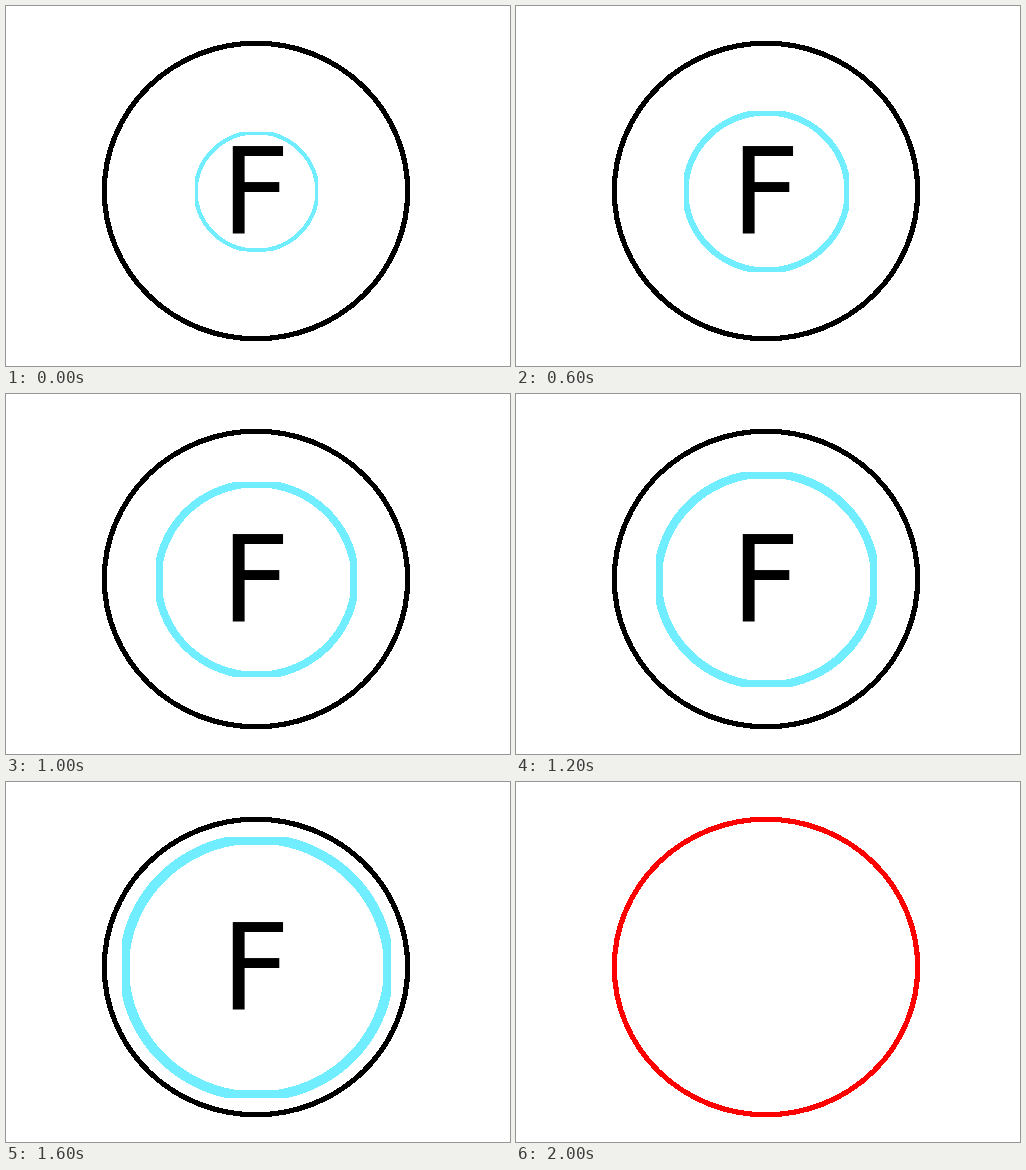
Recreate the animation shown at these times as an HTML page. Size 504 by 360 pixels, loop 2.5 s.

```html
<!DOCTYPE html>
<html lang="en">
<head>
<meta charset="utf-8">
<style>
  html, body { margin: 0; width: 100%; height: 100%; overflow: hidden; background: #fff; }
  svg { display: block; width: 504px; height: 360px; }
  text { font: 120px "DejaVu Sans", sans-serif; }
</style>
</head>
<body>
<svg viewBox="0 0 504 360" fill="none" shape-rendering="crispEdges">
  <clipPath id="inside"><ellipse cx="250" cy="185" rx="152" ry="148"/></clipPath>
  <g clip-path="url(#inside)"><path id="wave" fill="#70eeff" fill-rule="evenodd"/></g>
  <ellipse id="rim" cx="250" cy="185" rx="151.7" ry="147.8" stroke-width="5.2"/>
  <text id="key" x="214.9" y="228" fill="#000">F</text>
</svg>
<script>
const LOOP = 2500, STEP = 100, LAST = 20;
const CX = 250.5, CY = 185.5;
const [wave, rim, key] = ["wave", "rim", "key"].map(id => document.getElementById(id));

const clampUnit = v => Math.max(-1, Math.min(1, v));

// Ellipse enlarged by `bulge`, then cut flat at rx and ry.
function flattened(rx, ry, bulge) {
  const points = [];
  for (let degrees = 0; degrees < 360; degrees += 3) {
    const a = degrees * Math.PI / 180;
    points.push((CX + rx * clampUnit(bulge * Math.cos(a))).toFixed(2) + "," +
                (CY + ry * clampUnit(bulge * Math.sin(a))).toFixed(2));
  }
  return "M" + points.join("L") + "Z";
}

function draw(ms) {
  const step = Math.min(LAST, Math.floor((ms % LOOP) / STEP));
  const done = step === LAST;
  rim.setAttribute("stroke", done ? "#f00" : "#000");
  key.style.display = wave.style.display = done ? "none" : "";
  if (done) return;

  const scale = 1.05 ** step;
  const width = 3.4 + 0.3 * step;
  const rx = 61.6 * scale, ry = 60 * scale;
  wave.setAttribute("d", flattened(rx, ry, 1.022) +
                         flattened(rx - width, ry - width, 1.01));
}

const start = performance.now();
function tick(now) {
  draw(Math.max(0, now - start));
  requestAnimationFrame(tick);
}
draw(0);
requestAnimationFrame(tick);
</script>
</body>
</html>
```
